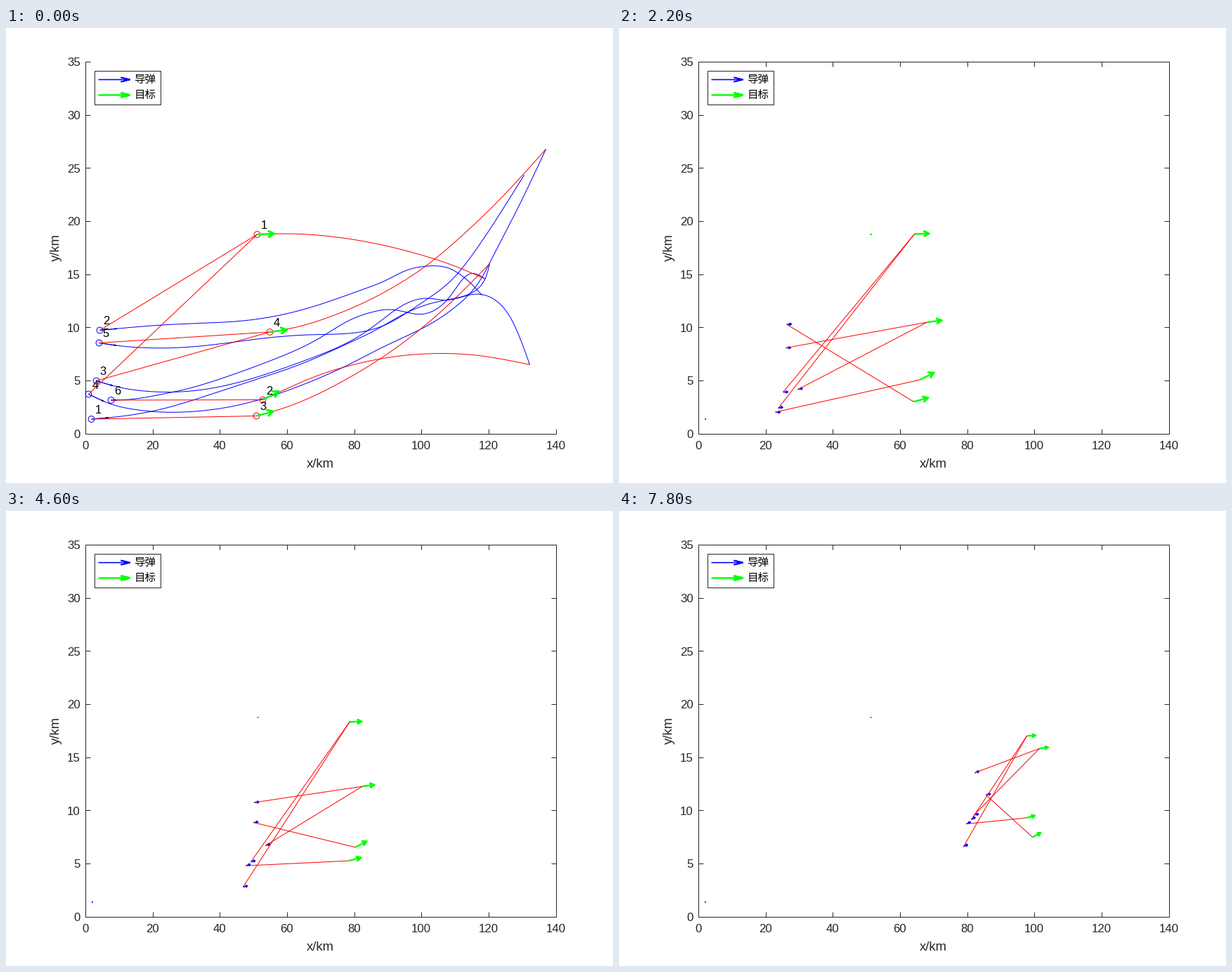
A matplotlib script for the animation above (8 s loop, 864 by 648 pixels).

```python
import numpy as np
import matplotlib.pyplot as plt
from matplotlib.animation import FuncAnimation
from matplotlib.patches import Circle, Rectangle

W, H, DPI = 864, 648, 100
FRAMES, INTERVAL = 40, 200
L, R, TOP, BOT = 112.5, 782, 47.5, 577
INK, BLUE, RED, GREEN = "#262626", "#0000ff", "#ff0000", "#00ff00"
TARGET_STEP, MISSILE_STEP = 5.72, 9.56

plt.rcParams["font.family"] = ["Liberation Sans", "Noto Sans CJK JP"]
fig = plt.figure(figsize=(W / DPI, H / DPI), dpi=DPI, facecolor="white")
ax = fig.add_axes([0, 0, 1, 1])
ax.set_xlim(-0.5, W - 0.5)
ax.set_ylim(H - 0.5, -0.5)
ax.axis("off")


def px(v):
    return v * 72 / DPI


def line(xs, ys, color, width=1.0, z=2):
    return ax.plot(xs, ys, color=color, lw=px(width), zorder=z,
                   solid_capstyle="butt", solid_joinstyle="miter")[0]


def text(x, y, s, size, color=INK, **kw):
    kw = {"ha": "center", "va": "center_baseline", **kw}
    return ax.text(x, y, s, fontsize=px(size), color=color, zorder=9, **kw)


def arrow(x, y, dx, dy, back=0.35, half=0.19):
    """Outline of an open-headed arrow drawn in one stroke."""
    tx, ty = x + dx, y + dy
    bx, by = tx - back * dx, ty - back * dy
    nx, ny = -half * dy, half * dx
    return ([x, tx, bx + nx, tx, bx - nx, tx],
            [y, ty, by + ny, ty, by - ny, ty])


def spline(points, samples=400):
    """Natural cubic spline through the points, by chord length."""
    p = np.array(points, float)
    t = np.r_[0, np.cumsum(np.hypot(*np.diff(p, axis=0).T))]
    h, n = np.diff(t), len(t)
    a, b = np.eye(n), np.zeros((n, 2))
    slope = np.diff(p, axis=0) / h[:, None]
    for i in range(1, n - 1):
        a[i, i - 1:i + 2] = h[i - 1], 2 * (h[i - 1] + h[i]), h[i]
        b[i] = 6 * (slope[i] - slope[i - 1])
    m = np.linalg.solve(a, b)
    u = np.linspace(0, t[-1], samples)
    k = np.clip(np.searchsorted(t, u, side="right") - 1, 0, n - 2)
    d, e, hk = (u - t[k])[:, None], (t[k + 1] - u)[:, None], h[k][:, None]
    q = ((m[k] * e**3 + m[k + 1] * d**3) / (6 * hk)
         + (p[k] / hk - m[k] * hk / 6) * e
         + (p[k + 1] / hk - m[k + 1] * hk / 6) * d)
    return q.T


class Track:
    def __init__(self, step, *points):
        self.step, self.x0 = step, points[0][0]
        self.xs, self.ys = spline(points)
        self.cut = int(np.argmax(self.xs > 610))

    def y(self, x):
        return np.interp(x, self.xs[:self.cut], self.ys[:self.cut])

    def at(self, k):
        x = self.x0 + self.step * k
        return x, self.y(x)

    def heading(self, k, length):
        x, y = self.at(k)
        v = np.array([length, self.y(x + length) - y])
        return v * length / np.hypot(*v)


targets = [
    Track(TARGET_STEP, (357, 293.5), (397, 292.5), (443, 294.5), (489, 300),
          (535, 308.5), (581, 320), (630, 335.5), (682, 357)),
    Track(TARGET_STEP, (365, 529), (405, 510.5), (450, 492), (496, 478.5),
          (542, 469), (588, 464), (617, 463), (680, 467), (745, 479)),
    Track(TARGET_STEP, (356, 552), (397, 540), (442, 521.5), (487, 498),
          (533, 470), (578, 437.5), (630, 393), (688, 335)),
    Track(TARGET_STEP, (375, 432.5), (415, 425), (460, 411), (506, 392),
          (551, 368.5), (597, 338.5), (640, 303), (700, 246), (768, 172)),
]
missiles = [
    Track(MISSILE_STEP, (121, 556.5), (155, 553.5), (188, 549), (226, 541),
          (264, 530), (340, 505), (417, 479), (492, 446), (525, 430),
          (560, 410), (600, 393), (630, 386), (655, 380), (675, 367),
          (688, 335)),
    Track(MISSILE_STEP, (133, 430), (200, 424), (239, 421.5), (278, 420),
          (354, 414.5), (431, 398), (507, 372), (540, 359), (570, 344.5),
          (600, 338.5), (628, 341), (648, 352), (665, 367), (677, 380)),
    Track(MISSILE_STEP, (128, 502), (160, 511), (196, 516.5), (234, 518),
          (272, 515.5), (349, 499), (425, 473), (501, 439), (535, 415),
          (565, 394), (598, 384.5), (628, 387), (668, 378.5), (687, 382),
          (707, 397), (726, 429), (745, 479)),
    Track(MISSILE_STEP, (117, 521), (150, 535.5), (184, 543), (222, 546.5),
          (261, 546), (337, 535), (413, 511), (489, 478), (540, 452),
          (600, 423), (640, 396), (668, 368), (690, 330), (725, 262),
          (768, 172)),
    Track(MISSILE_STEP, (132, 448), (160, 452), (200, 455), (238, 455),
          (276, 452.5), (353, 443), (429, 436.5), (480, 435), (504, 432.5),
          (540, 422), (570, 405), (600, 385), (630, 362), (660, 327),
          (700, 268), (737, 209)),
    Track(MISSILE_STEP, (149, 529.5), (180, 528), (217, 522), (255, 514),
          (293, 503), (369, 476), (446, 441), (490, 415), (521, 404),
          (545, 400.5), (568, 404), (592, 407), (612, 400), (640, 370),
          (663, 349), (682, 357)),
]
slopes = [-0.04, -0.51, -0.27, -0.13]

# target number chased by missiles 1..6 from the given step on
plans = [(0, (3, 1, 4, 1, 4, 2)), (5, (1, 3, 4, 2, 4, 1)),
         (10, (1, 3, 1, 2, 4, 4)), (20, (3, 4, 1, 1, 2, 4)),
         (35, (3, 4, 1, 1, 4, 2))]

# axes
intro, live = [], []
line([L, L], [TOP, BOT], INK)
line([L, R], [BOT, BOT], INK)
live += [line([L, R], [TOP, TOP], INK), line([R, R], [TOP, BOT], INK)]
TICK = 6.7
for i in range(8):
    x, y = L + (R - L) * i / 7, BOT - (BOT - TOP) * i / 7
    line([x, x], [BOT, BOT - TICK], INK)
    line([L, L + TICK], [y, y], INK)
    live += [line([x, x], [TOP, TOP + TICK], INK),
             line([R, R - TICK], [y, y], INK)]
    text(x, 593.5, str(20 * i), 16.7)
    text(105.5, y + 0.5, str(5 * i), 16.7, ha="right")
text(447, 618.5, "x/km", 18.5)
text(71, 312.5, "y/km", 18.5, rotation=90, va="center")

# legend
ax.add_patch(Rectangle((125, 60), 94, 48, fc="white", ec=INK, lw=px(1), zorder=7))
for y, color, width, label in [(73, BLUE, 1.6, "导弹"), (95, GREEN, 2.4, "目标")]:
    line(*arrow(131, y, 45, 0, 0.29, 0.07), color, width, 8)
    text(182, y, label, 15.5, "black", ha="left", va="center",
         family="Noto Sans CJK JP")

# opening picture: whole paths, start marks and numbers
for group, color in [(missiles, BLUE), (targets, RED)]:
    for tr in group:
        intro.append(line(tr.xs, tr.ys, color, 1))
        ring = Circle((tr.x0, tr.ys[0]), 4.4, fill=False, ec=color, lw=px(1), zorder=4)
        intro.append(ax.add_patch(ring))
for n, tr in enumerate(missiles, 1):
    dx, dy = tr.heading(0, 9 if n == 6 else 25)
    x, y = tr.at(0)
    intro.append(line([x, x + dx], [y, y + dy], BLUE, 1))
    u = np.array([dx, dy]) / np.hypot(dx, dy)
    tip = np.array([x + dx, y + dy])
    side = np.array([-u[1], u[0]])
    head = np.array([tip, tip - 4 * u + 1.4 * side, tip - 4 * u - 1.4 * side])
    intro += ax.fill(*head.T, color="#00004d", lw=0, zorder=4)
    intro.append(text(x + 9.5, y - 14, str(n), 16.5, "black"))
for n, tr in enumerate(targets, 1):
    intro.append(text(tr.x0 + 9.5, tr.ys[0] - 14, str(n), 16.5, "black"))

# remains of the legend arrows at their start points
live += [line([356.5, 359.5], [293.5, 293.5], GREEN, 2),
         line([121, 123], [556.5, 556.5], BLUE, 1.6)]

bodies = [line([], [], BLUE, 1.6, 3) for _ in missiles]
links = [line([], [], RED, 1, 4) for _ in missiles]
goals = [line([], [], GREEN, 2.4, 5) for _ in targets]
live += bodies


def draw(k):
    for a in intro:
        a.set_visible(k == 0)
    for a in live:
        a.set_visible(k > 0)
    plan = [p for start, p in plans if start <= k][-1]
    for tr, body, link, goal in zip(missiles, bodies, links, plan):
        x, y = tr.at(k)
        tx, ty = targets[goal - 1].at(k)
        body.set_data(*arrow(x, y, *tr.heading(k, 6.5), 0.4, 0.22))
        link.set_data([x, tx], [y, ty])
    size = 24 - 0.31 * k
    for tr, goal, s in zip(targets, goals, slopes):
        dx = size / np.hypot(1, s * 0.6)
        goal.set_data(*arrow(*tr.at(k), dx, s * dx))
    return []


anim = FuncAnimation(fig, draw, frames=FRAMES, interval=INTERVAL,
                     init_func=lambda: draw(0), repeat=True, repeat_delay=0)
plt.show()
```
